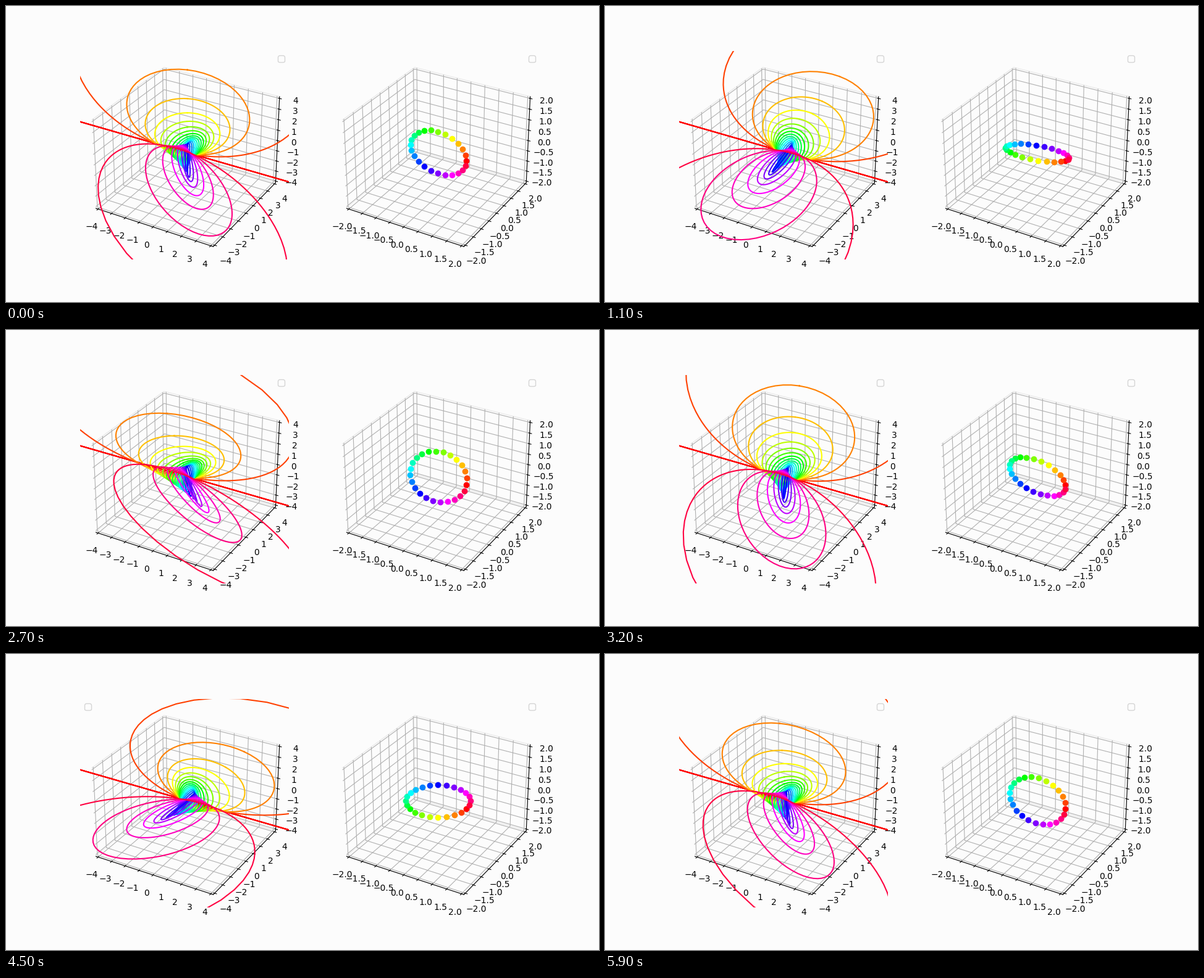
Recreate the animation shown at these times as a matplotlib script. Size 960 px wide and 480 px high, loop 6000 ms.

```python
"""Hopf fibration: a turning great circle on the sphere and its fibres in space."""
import colorsys

import matplotlib.pyplot as plt
import numpy as np
from matplotlib.animation import FuncAnimation

BACK = "#fcfcfc"
PANE_EDGE = "#ebebeb"
POINTS = 24
FRAMES = 60

plt.rcParams.update({
    "axes3d.automargin": True,
    "figure.facecolor": BACK,
    "axes.facecolor": BACK,
})

theta = np.arange(POINTS) * 2 * np.pi / POINTS
colors = [colorsys.hsv_to_rgb(k / POINTS, 1, 1) for k in range(POINTS)]
t = np.radians(np.arange(361))


def fibre(angle, turn):
    """Stereographic image of the fibre over a point of the circle."""
    near, far = np.cos(angle / 2), np.sin(angle / 2)
    phase = np.pi - turn - t
    scale = 1 / (1 - near * np.cos(t) + 1e-12)
    return (near * np.sin(t) * scale,
            far * np.cos(phase) * scale,
            far * np.sin(phase) * scale)


def make_axes(fig, place, limit, style):
    ax = fig.add_subplot(place, projection="3d")
    artists = [ax.plot([0], [0], [0], style, color=c)[0] for c in colors]
    ax.set(xlim=(-limit, limit), ylim=(-limit, limit), zlim=(-limit, limit))
    for axis in (ax.xaxis, ax.yaxis, ax.zaxis):
        axis.set_pane_color(BACK)
        axis.pane.set_edgecolor(PANE_EDGE)
    ax.legend([], [], loc="best")
    return artists


fig = plt.figure(figsize=(9.6, 4.8), dpi=100)
fibres = make_axes(fig, 121, 4, "-")
dots = make_axes(fig, 122, 2, "o")


def update(n):
    # The arctangent makes the circle jump back by half a turn.
    turn = np.pi / 2 + np.arctan(np.tan(2 * np.pi * n / FRAMES))
    for angle, line, dot in zip(theta, fibres, dots):
        line.set_data_3d(*fibre(angle, turn))
        dot.set_data_3d([np.cos(angle)],
                        [np.sin(angle) * np.cos(turn)],
                        [np.sin(angle) * np.sin(turn)])
    return fibres + dots


anim = FuncAnimation(fig, update, frames=FRAMES, interval=100, repeat=True)
plt.show()
```
